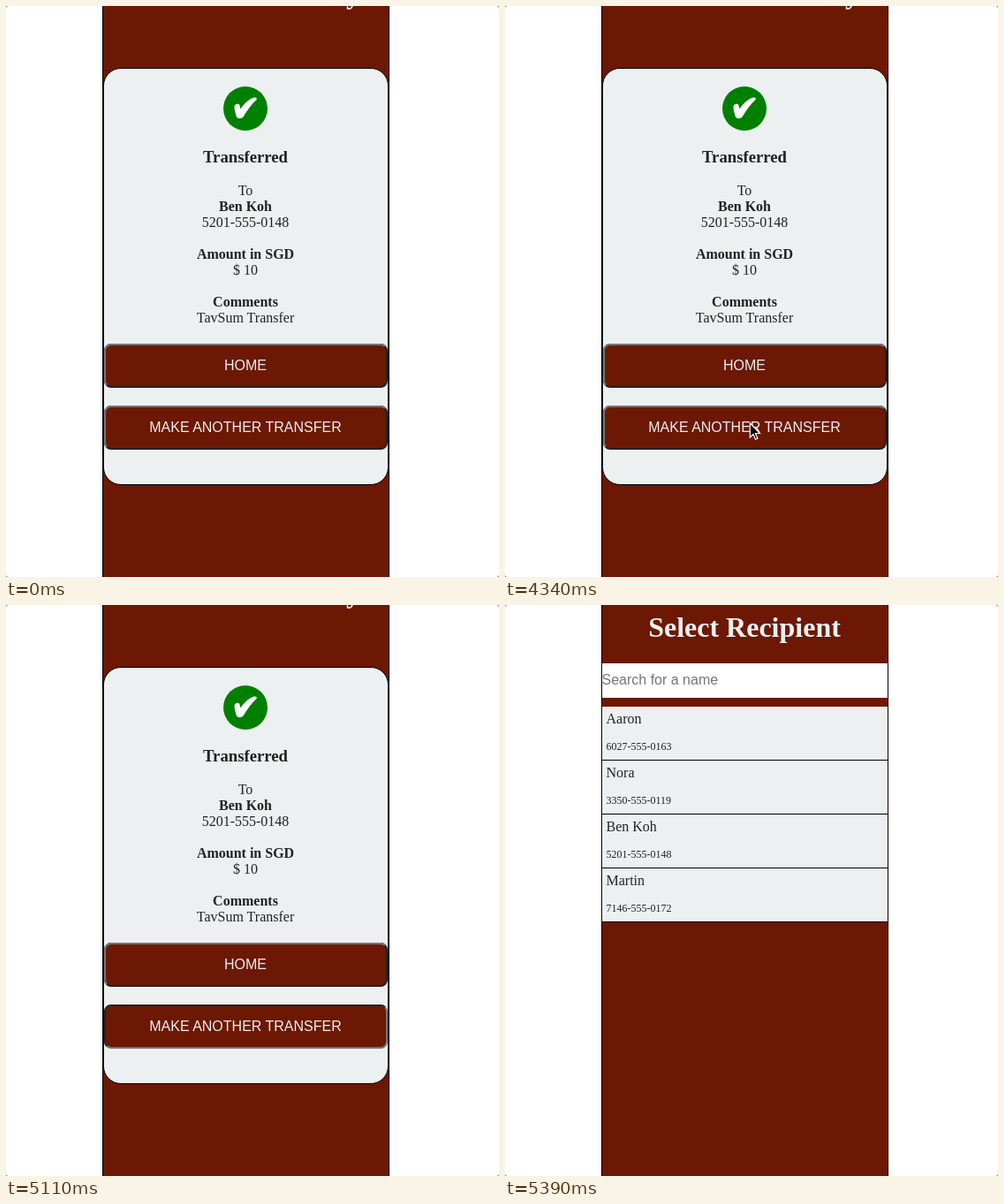
Recreate the animation shown at these times as an HTML page. Size 558 px wide and 646 px high, loop 6230 ms.

```html
<!DOCTYPE html>
<html lang="en">
<head>
<meta charset="utf-8">
<title>Transfer</title>
<style>
  html, body { margin: 0; width: 100%; height: 100%; overflow: hidden; background: #fff; }
  svg { display: block; width: 558px; height: 646px; }
  text { font: 16px "Liberation Serif", "Times New Roman", serif; fill: #222; }
  .mid { text-anchor: middle; }
  .bold { font-weight: bold; }
  .sub { font-size: 18.72px; font-weight: bold; }
  .title { font-size: 32px; font-weight: bold; fill: #ecf0f1; }
  .small { font-size: 12px; }
  .sans { font-family: "Liberation Sans", Arial, sans-serif; }
  .label { fill: #ecf0f1; }
  .hint { fill: #757575; }
  .edge { fill: none; stroke-width: 2; }
</style>
</head>
<body>
<svg id="stage" viewBox="0 0 558 646" xmlns="http://www.w3.org/2000/svg">
  <rect width="558" height="646" fill="#fff"/>
  <rect x="109" width="325" height="646" fill="#000"/>
  <rect x="110" width="323" height="646" fill="#6c1804"/>

  <g id="receipt">
    <text class="title" x="385" y="-3">y</text>
    <rect x="110.5" y="70.5" width="322" height="471" rx="19.5" fill="#ecf0f1" stroke="#000"/>
    <circle cx="271" cy="116" r="25" fill="#008000"/>
    <path fill="#fff" d="M258.6 113C260 110.5 263.5 110 264.3 112L265.5 116.5C270 110 275 105.5 280 103.8C283 103 284.5 104.2 283.6 106C278 111 273 118 268.8 125C266.5 128 262 128 260.8 125C260 121.5 258 117 258.6 113Z"/>
  </g>

  <g id="picker">
    <text class="title mid" x="271" y="36">Select Recipient</text>
    <rect x="110" y="66" width="323" height="39" fill="#fff"/>
    <text class="sans hint" x="109.5" y="90">Search for a name</text>
  </g>

  <path id="cursor" d="M0 0V16L3.7 12.5L6.2 18.2L8.6 17.2L6.1 11.5H11.2Z" fill="#000" stroke="#fff" stroke-width="1.2"/>
  <path fill="#777" fill-rule="evenodd" d="M0 0H558V646H0ZM3 0Q0 0 0 3V643Q0 646 3 646H555Q558 646 558 643V3Q558 0 555 0Z"/>
</svg>
<script>
const LOOP = 6230;
const SHOW = 4340, NUDGE = 4970, PRESS = 5040, LEAVE = 5110, SWITCH = 5250;
const LIGHT = '#767676', DARK = '#222';
const RED = '#6c1804';

const $ = id => document.getElementById(id);
const receipt = $('receipt'), picker = $('picker'), cursor = $('cursor');

function add(parent, tag, attrs, content = '') {
  const el = document.createElementNS('http://www.w3.org/2000/svg', tag);
  for (const key in attrs) el.setAttribute(key, attrs[key]);
  el.textContent = content;
  parent.append(el);
  return el;
}

// Bevelled button; returns a function that sets its pressed state.
function addButton(y, label) {
  const base = add(receipt, 'rect', {
    class: 'edge', x: 112, y: y + 1, width: 319, height: 48, rx: 7, style: `fill:${RED}`
  });
  const top = add(receipt, 'path', {
    class: 'edge',
    d: `M114.05 ${y + 46.95}A7 7 0 0 1 112 ${y + 42}V${y + 8}A7 7 0 0 1 119 ${y + 1}H424A7 7 0 0 1 428.95 ${y + 3.05}`
  });
  add(receipt, 'text', { class: 'sans label mid', x: 271, y: y + 30 }, label);
  return pressed => {
    base.setAttribute('stroke', pressed ? LIGHT : DARK);
    top.setAttribute('stroke', pressed ? DARK : LIGHT);
  };
}

const lines = [
  ['sub', 177, 'Transferred'],
  ['', 214, 'To'],
  ['bold', 232, 'Ben Koh'],
  ['', 250, '5201-555-0148'],
  ['bold', 286, 'Amount in SGD'],
  ['', 304, '$ 10'],
  ['bold', 340, 'Comments'],
  ['', 358, 'TavSum Transfer']
];
for (const [style, y, text] of lines) add(receipt, 'text', { class: 'mid ' + style, x: 271, y }, text);

const people = [
  ['Aaron', '6027-555-0163'],
  ['Nora', '3350-555-0119'],
  ['Ben Koh', '5201-555-0148'],
  ['Martin', '7146-555-0172']
];
people.forEach(([name, phone], i) => {
  const y = 115 + 61 * i;
  add(picker, 'rect', { x: 110, y, width: 323, height: 60, fill: '#ecf0f1' });
  add(picker, 'rect', { x: 110, y: y + 60, width: 323, height: 1, fill: '#000' });
  add(picker, 'text', { x: 114.5, y: y + 19 }, name);
  add(picker, 'text', { class: 'small', x: 114.5, y: y + 49 }, phone);
});

const pressHome = addButton(382, 'HOME');
const pressAgain = addButton(452, 'MAKE ANOTHER TRANSFER');
pressHome(false);

const show = (el, on) => el.setAttribute('visibility', on ? 'visible' : 'hidden');

function draw(t) {
  show(receipt, t < SWITCH);
  show(picker, t >= SWITCH);
  show(cursor, t >= SHOW && t < LEAVE);
  const shift = t >= NUDGE ? 1 : 0;
  cursor.setAttribute('transform', `translate(${277.3 + shift} ${472 + shift})`);
  pressAgain(t >= PRESS);
}

const start = performance.now();
function tick() {
  draw((performance.now() - start) % LOOP);
  requestAnimationFrame(tick);
}
tick();
</script>
</body>
</html>
```
